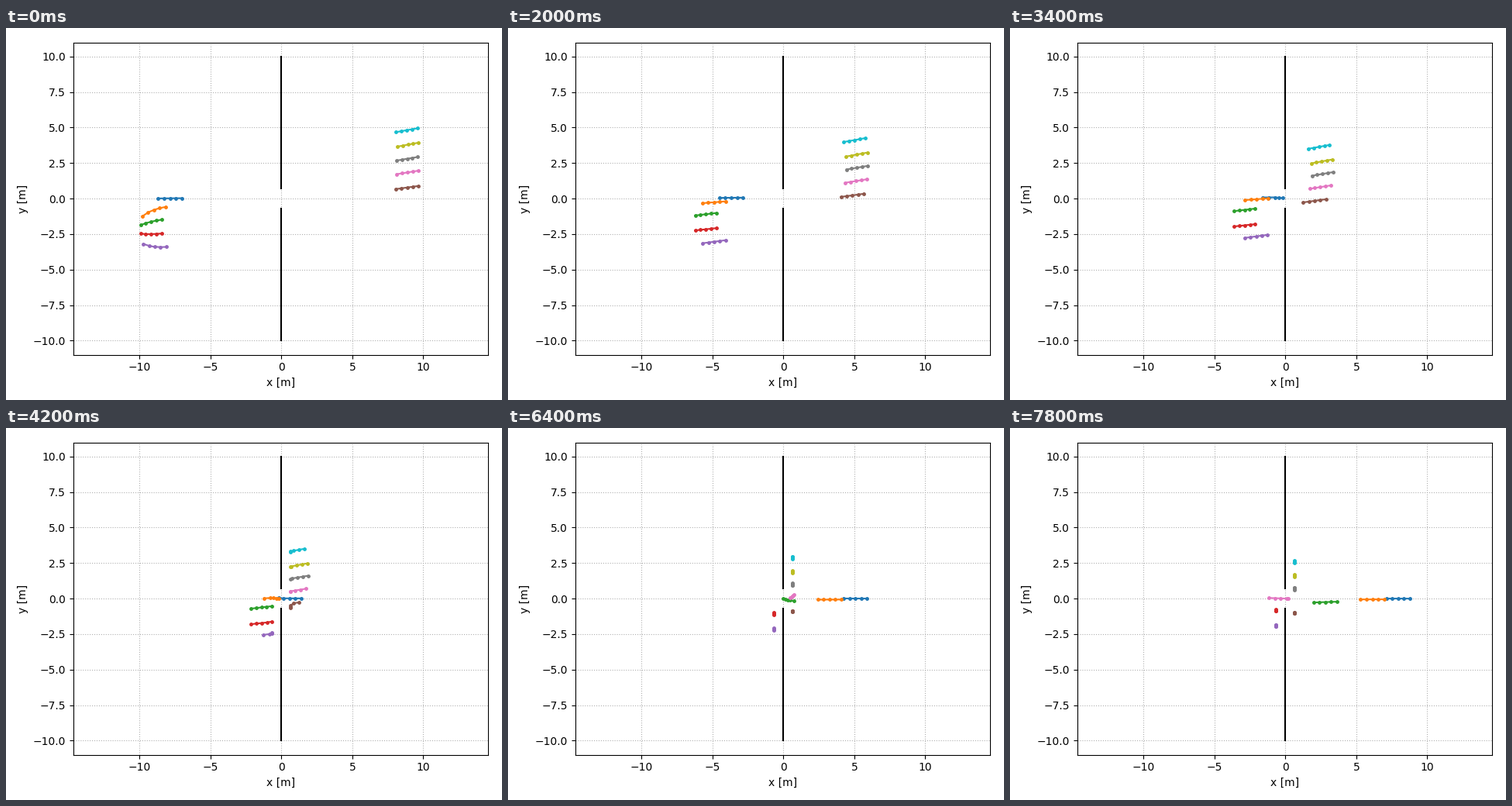
Animation of 640 by 480 pixels, one loop 8 s. Source, as a matplotlib script:

```python
import numpy as np
import matplotlib.pyplot as plt
from matplotlib.animation import FuncAnimation

W, H = 640, 480
FRAMES, STEP_MS, TRAIL = 40, 200, 5
WALL = 0.65   # distance kept from the wall while sliding along it
steps = np.arange(1 - TRAIL, FRAMES)

fig = plt.figure(figsize=(W / 100, H / 100), dpi=100)
left, bottom, right, top = 86.9, 58.24, 622.4, 461.49
ax = fig.add_axes([left / W, bottom / H, (right - left) / W, (top - bottom) / H])
scale, zero = (top - bottom) / 22, 355.17
ax.set(xlim=((left - zero) / scale, (right - zero) / scale), ylim=(-11, 11),
       xlabel="x [m]", ylabel="y [m]",
       xticks=np.arange(-10, 11, 5), yticks=np.arange(-10, 10.1, 2.5))
ax.grid(linestyle=":")
for side in (1, -1):
    ax.plot([0, 0], [0.7 * side, 10 * side], color="black")

agents = []


def walk(x, y, speed, wall_y, bend=0, end_y=None, ease=1, via=()):
    """Add an agent that heads straight for the wall.

    There it slides to end_y, or passes the door along (step, x, y) points.
    bend is the initial sideways offset that fades out.
    """
    side = np.sign(x)
    arrive = (abs(x) - WALL) / speed
    first, last = steps[0], steps[-1]
    start = (first, x - side * speed * first, y + (wall_y - y) * first / arrive)
    t, px, py = np.transpose([start, (arrive, side * WALL, wall_y), *via])
    xs, ys = np.interp(steps, t, px), np.interp(steps, t, py)
    if end_y is not None:
        p = np.clip((steps - arrive) / (last - arrive), 0, 1)
        ys += (end_y - wall_y) * p ** ease
    ys += bend * np.exp((first - steps) / 2)
    line, = ax.plot([], [], ".-", markersize=5, color=f"C{len(agents)}")
    agents.append((line, xs, ys))


# left group
walk(-7.0, 0.03, 0.417, 0.09, via=[(17.6, 0, 0.02), (39, 8.75, 0)])
walk(-8.14, -0.5, 0.409, 0.06, bend=-0.62,
     via=[(22, 0, 0), (25, 1.2, -0.08), (39, 6.95, -0.05)])
walk(-8.42, -1.45, 0.37, -0.53, bend=-0.24,
     via=[(24, -0.57, -0.25), (28, 0, 0), (31.5, 0.55, -0.15),
          (35, 2, -0.27), (39, 3.62, -0.22)])
walk(-8.42, -2.48, 0.371, -1.64, bend=0.17, end_y=-0.77, ease=0.6)
walk(-8.09, -3.47, 0.403, -2.47, bend=0.5, end_y=-1.83, ease=1.2)

# right group
walk(8.06, 0.67, 0.4, -0.35, end_y=-1.03, ease=0.4)
walk(8.12, 1.72, 0.377, 0.52,
     via=[(28, 0.78, 0.27), (32, 0.5, 0.08), (36, 0.1, 0), (39, -1.15, 0.05)])
walk(8.13, 2.68, 0.368, 1.4, end_y=0.63)
walk(8.17, 3.66, 0.3735, 2.26, end_y=1.55)
walk(8.08, 4.68, 0.381, 3.33, end_y=2.52)


def draw(n):
    for line, xs, ys in agents:
        line.set_data(xs[n:n + TRAIL], ys[n:n + TRAIL])
    return [line for line, *_ in agents]


anim = FuncAnimation(fig, draw, frames=FRAMES, interval=STEP_MS,
                     init_func=lambda: draw(0), repeat=True, repeat_delay=0)
plt.show()
```
